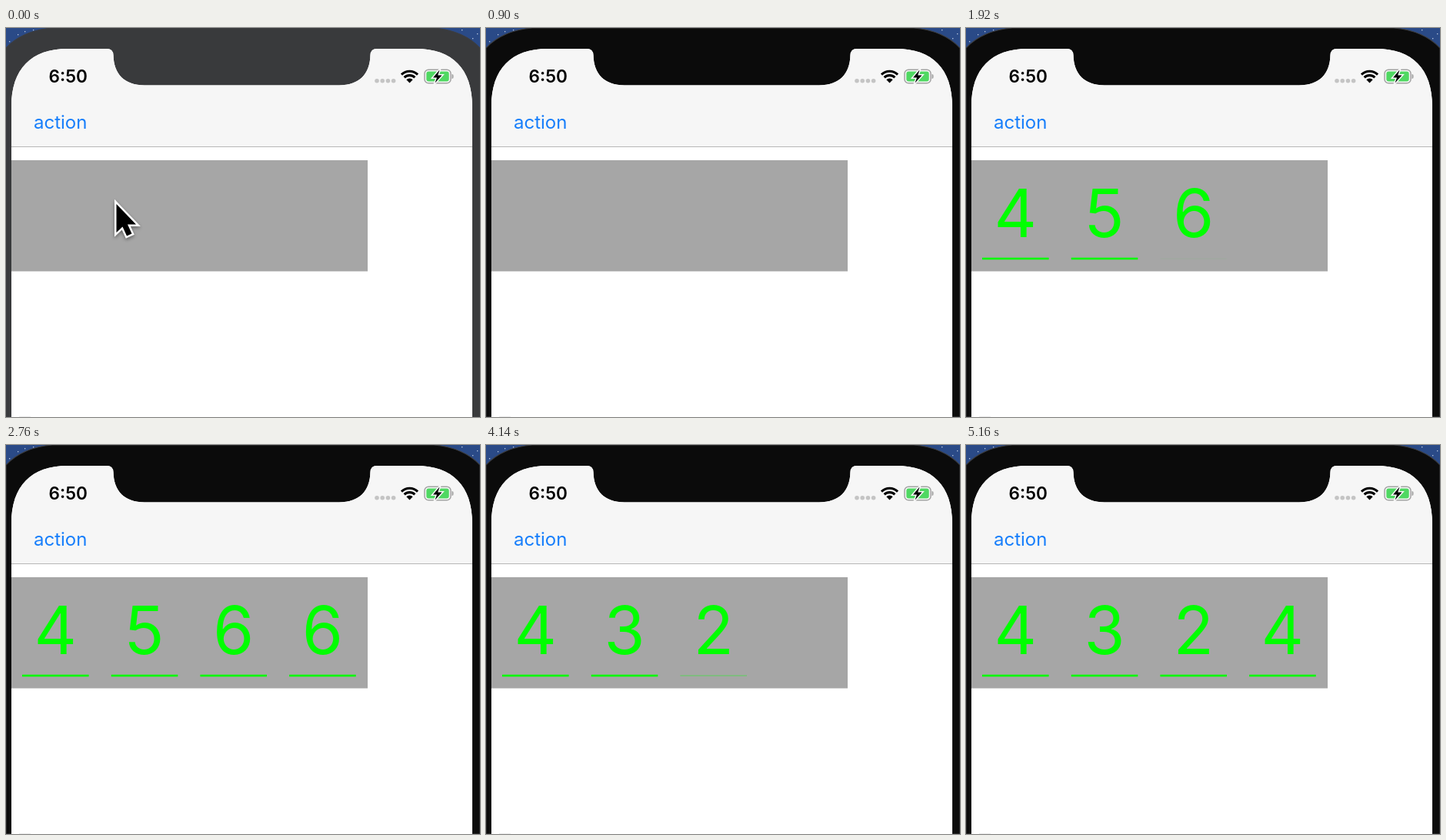
These frames come from a looping animation (616x506 px, 5.22 s). An HTML page with a canvas:

```html
<!DOCTYPE html>
<html lang="en">
<head>
<meta charset="utf-8">
<title>Code input</title>
<style>
  html, body { margin: 0; width: 100%; height: 100%; overflow: hidden; background: #fff; }
  canvas { display: block; width: 616px; height: 506px; }
</style>
</head>
<body>
<canvas id="stage" width="616" height="506"></canvas>
<script>
const ctx = document.getElementById('stage').getContext('2d');
const LOOP = 5220;
const STEP = 60;
const LINE_TIME = 260;
const FONT = 'Inter, "Liberation Sans", Arial, sans-serif';

// Each entry: slot, digit, time typed, time deleted
const keys = [
  [0, '4', 1260, Infinity],
  [1, '5', 1560, 3240],
  [2, '6', 1900, 3060],
  [3, '6', 2280, 2880],
  [1, '3', 3720, Infinity],
  [2, '2', 4070, Infinity],
  [3, '4', 4500, Infinity]
];

const clamp = v => Math.max(0, Math.min(1, v));
const ease = v => v * v * (3 - 2 * v);
const shape = d => new Path2D(d);

const bezel = shape('M0 26Q22 3 60 0H556Q594 3 616 26V506H0Z');
const screen = shape('M7 506V102C7 53 33 27 80 27H131Q139 27 139.5 35C140 60 154 74.5 180 74.5H433' +
  'C459 74.5 473 60 473.5 35Q474 27 482 27H533C580 27 606 53 606 102V506Z');
const bolt = shape('M563.5 54.5L555 64.5H560L557.5 71.5L566.5 61.5H561.2Z');
const pointer = shape('M143.5 229V266L151.5 258.5L157 270.5L163.5 267.5L158 255.5H169Z');

function fill(color, path) {
  ctx.fillStyle = color;
  ctx.fill(path);
}

function rect(color, x, y, w, h) {
  ctx.fillStyle = color;
  ctx.fillRect(x, y, w, h);
}

function dot(color, x, y, r) {
  ctx.fillStyle = color;
  ctx.beginPath();
  ctx.arc(x, y, r, 0, Math.PI * 2);
  ctx.fill();
}

function box(x, y, w, h, r) {
  ctx.beginPath();
  ctx.roundRect(x, y, w, h, r);
}

function text(str, x, y, size, color, weight = 400, align = 'left') {
  ctx.font = `${weight} ${size}px ${FONT}`;
  ctx.textAlign = align;
  ctx.fillStyle = color;
  ctx.fillText(str, x, y);
}

function drawWifi() {
  const x = 524.5, y = 71.5, a = Math.PI / 4.1;
  ctx.strokeStyle = '#000';
  ctx.lineCap = 'butt';
  ctx.lineWidth = 3.1;
  for (const r of [15.2, 9.9]) {
    ctx.beginPath();
    ctx.arc(x, y, r, -Math.PI / 2 - a, -Math.PI / 2 + a);
    ctx.stroke();
  }
  ctx.fillStyle = '#000';
  ctx.beginPath();
  ctx.moveTo(x, y);
  ctx.arc(x, y, 6, -Math.PI / 2 - a, -Math.PI / 2 + a);
  ctx.fill();
}

function drawBattery() {
  ctx.strokeStyle = '#a3a3a3';
  ctx.lineWidth = 1.5;
  box(544, 54.3, 34, 17.4, 5);
  ctx.stroke();
  ctx.fillStyle = '#4fd862';
  box(546.3, 56.5, 29.4, 13, 3);
  ctx.fill();
  ctx.fillStyle = '#a3a3a3';
  box(579.5, 60, 2, 6, [0, 2, 2, 0]);
  ctx.fill();
  ctx.strokeStyle = '#f7f7f7';
  ctx.lineWidth = 3;
  ctx.stroke(bolt);
  fill('#000', bolt);
}

function drawPhone(active) {
  rect('#2a4a87', 0, 0, 616, 506);
  for (const [x, y] of [[15, 8], [35, 2], [4, 17], [24, 4], [612, 7], [592, 2], [606, 13]])
    rect('#b9c6df', x, y, 1.3, 1.3);
  const mix = (a, b) => Math.round(a + (b - a) * active);
  fill(`rgb(${mix(57, 11)},${mix(58, 11)},${mix(60, 11)})`, bezel);
  ctx.strokeStyle = '#3c3d40';
  ctx.lineWidth = 1.2;
  ctx.stroke(bezel);

  ctx.save();
  ctx.clip(screen);
  rect('#fff', 0, 0, 616, 506);
  rect('#f6f6f6', 0, 0, 616, 154);
  rect('#b6b6b6', 0, 154, 616, 1);
  rect('#a6a6a6', 7, 172, 463, 144.5);
  rect('#ececec', 17, 505, 15, 1);
  ctx.restore();

  text('6:50', 55.5, 71, 22.6, '#000', 600);
  text('action', 36, 131.3, 24, '#167efb');
  for (let i = 0; i < 4; i++) dot('#c4c4c4', 482 + i * 7.2, 68.7, 2.8);
  drawWifi();
  drawBattery();
}

function drawKey([slot, digit, start, end], t) {
  const x = 64.3 + slot * 115.7;
  if (t >= start && t < end) text(digit, x, 272.3, 86, '#0f0', 400, 'center');
  const grow = ease(clamp((t - start) / LINE_TIME));
  const size = grow * (1 - ease(clamp((t - end) / LINE_TIME)));
  if (size > 0) {
    const h = 2.6 * size;
    rect('#0f0', x - 43.3, 300 - h / 2, 86.6, h);
  }
}

function drawPointer() {
  ctx.save();
  ctx.shadowColor = 'rgba(0,0,0,.4)';
  ctx.shadowBlur = 4;
  ctx.shadowOffsetY = 2;
  ctx.strokeStyle = '#fff';
  ctx.lineWidth = 5;
  ctx.lineJoin = 'miter';
  ctx.stroke(pointer);
  ctx.restore();
  fill('#000', pointer);
}

function render(ms) {
  const t = Math.floor((ms % LOOP) / STEP) * STEP;
  drawPhone(ease(clamp((t - 420) / 240)));
  for (const key of keys) drawKey(key, t);
  if (t < 720) drawPointer();
}

const begin = performance.now();
function tick() {
  render(performance.now() - begin);
  requestAnimationFrame(tick);
}
tick();
</script>
</body>
</html>
```
